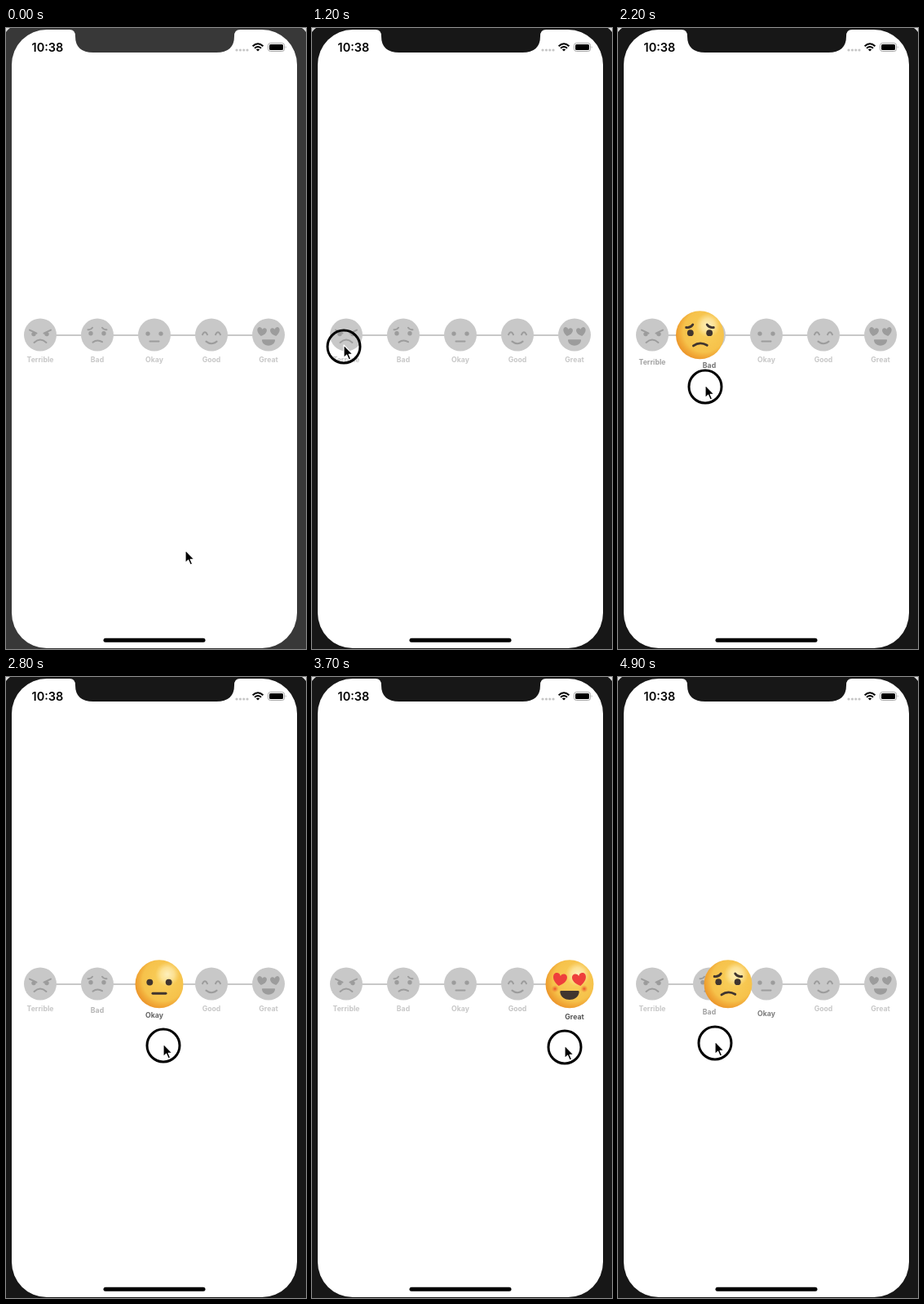
Write an HTML page that moves like this. It is 368 px wide and 760 px high and loops after 5000 ms.

```html
<!DOCTYPE html>
<html lang="en">
<head>
<meta charset="utf-8">
<title>Mood slider</title>
<style>
  html, body { margin: 0; width: 100%; height: 100%; overflow: hidden; background: #fff; }
  svg { display: block; width: 100%; height: 100%; }
  text { font-family: Inter, Roboto, sans-serif; }
  .label { font-size: 8.7px; font-weight: 700; text-anchor: middle; }
  .bezel { fill: currentColor; }
  .mood { color: #9c9c9c; }
  .big .mood { color: #40352f; --heart: #ee3f3c; --cheek: url(#blush); }
  .stroke { fill: none; stroke: currentColor; stroke-width: 2; stroke-linecap: round; }
  .solid { fill: currentColor; }
</style>
</head>
<body>
<svg viewBox="0 0 368 760" preserveAspectRatio="none">
  <defs>
    <radialGradient id="skin" cx=".59" cy=".42" r=".62">
      <stop offset="0" stop-color="#f9d05c"/>
      <stop offset=".7" stop-color="#f6c24b"/>
      <stop offset=".82" stop-color="#f2ae3b"/>
      <stop offset="1" stop-color="#eb9429"/>
    </radialGradient>
    <radialGradient id="shine">
      <stop offset="0" stop-color="#fff6cf" stop-opacity=".85"/>
      <stop offset=".55" stop-color="#fff0bb" stop-opacity=".6"/>
      <stop offset="1" stop-color="#ffe9a0" stop-opacity="0"/>
    </radialGradient>
    <radialGradient id="blush">
      <stop offset="0" stop-color="#ea4a2c"/>
      <stop offset="1" stop-color="#f08a35" stop-opacity="0"/>
    </radialGradient>
  </defs>

  <g id="phone">
    <rect class="bezel" width="368" height="760"/>
    <path d="M0 0H5Q2 2 0 5ZM368 0H363Q366 2 368 5Z" fill="#dcdcdc"/>
    <rect x="7" y="2" width="350" height="757" rx="43" fill="#fff"/>
    <path class="bezel" d="M78 1V2Q85 2 85 10Q85 30 107 30H258Q280 30 280 10Q280 2 287 2V1Z"/>
  </g>

  <text x="31.5" y="28.5" font-size="14.5" font-weight="600">10:38</text>
  <g fill="#c6c6c6">
    <circle cx="283" cy="27" r="1.6"/><circle cx="287.4" cy="27" r="1.6"/>
    <circle cx="291.7" cy="27" r="1.6"/><circle cx="296" cy="27" r="1.6"/>
  </g>
  <g fill="none" stroke="#000" stroke-width="2">
    <path d="M302.6 22.2Q309 16.4 315.4 22.2M305 24.7Q309 21.2 313 24.7"/>
    <path d="M306.8 26.2Q309 24.6 311.2 26.2L309 28.5Z" fill="#000" stroke="none"/>
  </g>
  <rect x="321.5" y="18.5" width="20" height="10" rx="2.8" fill="none" stroke="#a5a5a5"/>
  <rect x="323" y="20" width="17" height="7" rx="1.5"/>
  <path d="M342.8 21.8Q344.6 23.5 342.8 25.2Z" fill="#a5a5a5"/>
  <rect x="119.5" y="746.7" width="125" height="5" rx="2.5"/>

  <path d="M42 376H322" stroke="#c8c8c8" stroke-width="2"/>
  <g id="stops"></g>

  <g id="thumb" class="big">
    <circle r="29.5" fill="url(#skin)"/>
    <circle cx="10" cy="-12" r="15" fill="url(#shine)"/>
    <g id="thumbMoods" transform="scale(1.46)"></g>
  </g>

  <g id="pointer">
    <circle id="ring" r="20" fill="none" stroke="#000" stroke-width="3"/>
    <path d="M0 -2V13.6L3.6 10.2L6.2 16L8.7 14.9L6.2 9.3H11Z"
          stroke="#fff" stroke-width="1.2" stroke-linejoin="round"/>
  </g>
</svg>

<script>
const LOOP = 5000, STEP = 100, LABEL_EASE = 150;
const $ = id => document.getElementById(id);

const mirrored = shape => shape + `<g transform="scale(-1 1)">${shape}</g>`;
const stroke = d => `<path class="stroke" d="${d}"/>`;
const eye = y => `<circle class="solid" cx="8" cy="${y}" r="2.7"/>`;
const heart = `<path transform="translate(8.2 -4) rotate(-10)" style="fill:var(--heart,currentColor)"
  d="M0 5.6C-8 1 -6.5 -5 -3 -5Q-.8 -5 0 -2.8Q.8 -5 3 -5C6.5 -5 8 1 0 5.6Z"/>`;
const cheek = '<circle cx="12.3" cy="4" r="3.2" style="fill:var(--cheek,none)"/>';

const moods = [
  ['Terrible', mirrored(stroke('M13 -6L4.5 -2') + eye(-1)) + stroke('M-7.5 9.3Q0 2.5 7.5 9.3')],
  ['Bad', mirrored(stroke('M6 -8.8Q8 -5.8 11.5 -6.4') + eye(-1.8)) + stroke('M-5.5 9Q0 5 6 8.6')],
  ['Okay', mirrored(eye(-1.5)) + stroke('M-5.5 7.8H5.5')],
  ['Good', mirrored(stroke('M5 -.4Q8 -6.2 11 -.4')) + stroke('M-6.5 8Q0 13.2 6.5 8')],
  ['Great', mirrored(heart + cheek) +
    '<path class="solid" d="M-7.2 5.6H7.2Q8.3 5.6 8 7C6.8 15.2 -6.8 15.2 -8 7Q-8.3 5.6 -7.2 5.6Z"/>']
];
const stopX = i => 42 + 70 * i;

$('stops').innerHTML = moods.map(([name, face], i) => `
  <g transform="translate(${stopX(i)} 375.6)">
    <circle r="20" fill="#c8c8c8"/><g class="mood">${face}</g>
    <text class="label" y="33.4">${name}</text>
  </g>`).join('');
$('thumbMoods').innerHTML = moods.map(([, face]) => `<g class="mood">${face}</g>`).join('');
const labels = [...document.querySelectorAll('.label')];
const thumbMoods = [...$('thumbMoods').children];

// Keyframes: [time, x, y]
const pointerKeys = [
  [0, 220, 641], [200, 150, 520], [400, 62, 380], [500, 44, 388], [600, 40, 397], [700, 39, 390],
  [1400, 39, 390], [1900, 67, 426], [2200, 107, 439], [2500, 150, 449], [2800, 193, 451],
  [3100, 278, 453], [3400, 317, 453], [3600, 317, 453], [3700, 310, 453], [4200, 208, 455.5],
  [4400, 182, 455], [4800, 138, 453], [4900, 119, 448]
];
const thumbKeys = [
  [1300, 42], [1500, 43], [1900, 63], [2200, 100.5], [2500, 142], [2800, 188], [3100, 270],
  [3400, 316], [3700, 316], [4200, 217], [4400, 193], [4800, 149], [4900, 135]
];
// Selected stop: [time, index]
const selections = [
  [1300, 0], [2020, 1], [2530, 2], [2906, 3], [3210, 4], [3846, 3], [4200, 2], [4835, 1]
];

const clamp = v => Math.min(1, Math.max(0, v));
const mix = (a, b, k) => a + (b - a) * k;

function sample(keys, t) {
  const next = keys.findIndex(key => key[0] > t);
  if (next === 0) return keys[0].slice(1);
  if (next < 0) return keys.at(-1).slice(1);
  const a = keys[next - 1], b = keys[next];
  const k = (t - a[0]) / (b[0] - a[0]);
  return a.slice(1).map((v, i) => mix(v, b[i + 1], k));
}

function labelAmount(index, t) {
  let amount = 0;
  selections.forEach(([start, selected], i) => {
    if (t <= start) return;
    const end = Math.min(t, selections[i + 1]?.[0] ?? LOOP);
    const goal = selected === index ? 1 : 0;
    amount = mix(goal, amount, Math.exp((start - end) / LABEL_EASE));
  });
  return amount;
}

function draw(t) {
  $('phone').style.color = t < 900 ? '#383838' : '#171717';

  const [px, py] = sample(pointerKeys, t);
  $('pointer').setAttribute('transform', `translate(${px} ${py})`);
  $('ring').style.opacity = clamp((t - 800) / 300);

  const grow = 1 - (1 - clamp((t - 1300) / 300)) ** 2;
  const [x] = sample(thumbKeys, t);
  $('thumb').setAttribute('transform', `translate(${x} 375.8) scale(${grow})`);
  $('thumb').style.display = grow ? '' : 'none';
  const selected = selections.findLast(([start]) => start <= t)?.[1];
  thumbMoods.forEach((mood, i) => { mood.style.display = i === selected ? '' : 'none'; });

  labels.forEach((label, i) => {
    const amount = labelAmount(i, t), shade = mix(200, 80, amount);
    label.setAttribute('transform', `translate(0 ${10 * amount})`);
    label.style.fill = `rgb(${shade} ${shade} ${shade})`;
  });
}

const begin = performance.now();
function tick() {
  const elapsed = (performance.now() - begin) % LOOP;
  draw(Math.floor(elapsed / STEP) * STEP);
  requestAnimationFrame(tick);
}
tick();
</script>
</body>
</html>
```
